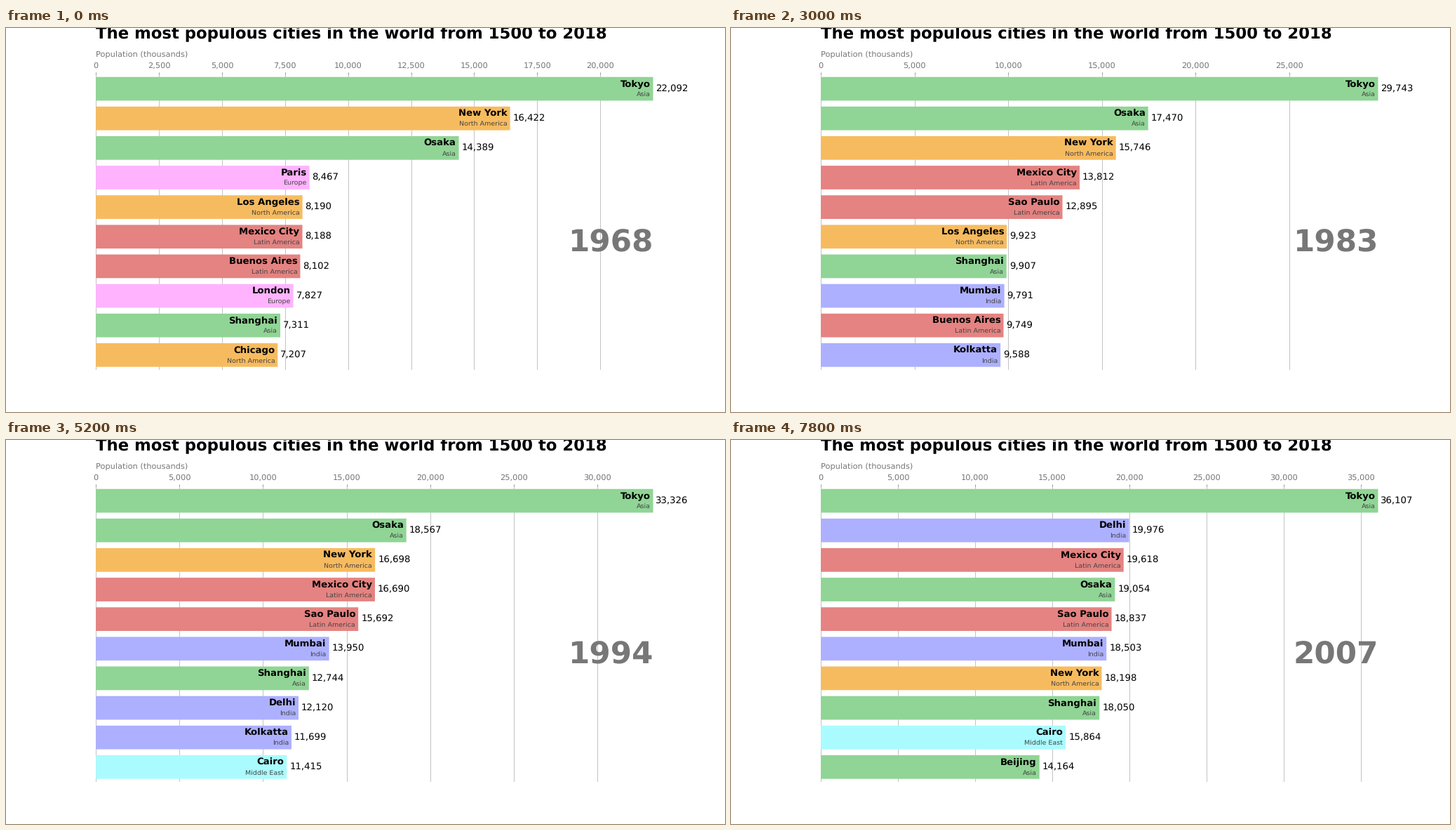
Animation of 1025x547 px, one loop 8000 ms. Source, as a matplotlib script:

```python
import numpy as np
import matplotlib.pyplot as plt
from matplotlib.animation import FuncAnimation
from matplotlib.ticker import StrMethodFormatter

WIDTH, HEIGHT = 1025, 547
DPI = WIDTH / 15
FIRST_YEAR, LAST_YEAR = 1968, 2007
GREY = "#777777"

COLORS = {
    "Asia": "#90d595",
    "Europe": "#ffb3ff",
    "North America": "#f7bb5f",
    "Latin America": "#e48381",
    "India": "#adb0ff",
    "Middle East": "#aafbff",
}

# Cities grow in straight lines between these years.
KEY_YEARS = (1968, 1974, 1980, 1990, 2002, 2007)

# name: region, first key year, thousands of people at the key years from there
CITIES = {
    "Tokyo": ("Asia", 1968, (22092, 25952, 28549, 32530, 34919, 36107)),
    "New York": ("North America", 1968,
                 (16422, 17131, 15601, 16086, 17923, 18198)),
    "Osaka": ("Asia", 1968, (14389, 16093, 17028, 18500, 18701, 19054)),
    "Mexico City": ("Latin America", 1968,
                    (8188, 10840, 13028, 15642, 18785, 19618)),
    "Sao Paulo": ("Latin America", 1968,
                  (6820, 9215, 12089, 14776, 17524, 18837)),
    "Shanghai": ("Asia", 1968, (7311, 7980, 9192, 11575, 15081, 18050)),
    "Los Angeles": ("North America", 1968, (8190, 8950, 9512, 10883, 11600)),
    "Buenos Aires": ("Latin America", 1968, (8102, 8721, 9422, 10513, 12000)),
    "Paris": ("Europe", 1968, (8467, 9295, 8720)),
    "London": ("Europe", 1968, (7827, 7400)),
    "Chicago": ("North America", 1968, (7207, 7250)),
    "Rio de Janeiro": ("Latin America", 1968, (6480, 8040, 8784)),
    "Kolkatta": ("India", 1968, (6650, 7696, 9030, 10890, 13316, 13935)),
    "Mumbai": ("India", 1974, (6750, 8658, 12436, 16977, 18503)),
    "Delhi": ("India", 1990, (9726, 16907, 19976)),
    "Cairo": ("Middle East", 1990, (10000, 14245, 15864)),
    "Beijing": ("Asia", 2002, (11222, 14164)),
}


def population(name, year):
    _, start, values = CITIES[name]
    first = KEY_YEARS.index(start)
    years = KEY_YEARS[first:first + len(values)]
    return np.interp(year, years, values, left=0)


def top_ten(year):
    """The ten largest cities, smallest first."""
    ranked = sorted((population(name, year), name) for name in CITIES)
    return ranked[-10:]


def draw_bars(rows):
    gap = rows[-1][0] / 200
    for y, (value, name) in enumerate(rows):
        region = CITIES[name][0]
        ax.barh(y, value, color=COLORS[region], snap=False)
        ax.text(value - gap, y, name, size=14, weight=600,
                ha="right", va="bottom")
        ax.text(value - gap, y - 0.25, region, size=10, color="#444444",
                ha="right", va="baseline")
        ax.text(value + gap, y, f"{value:,.0f}", size=14,
                ha="left", va="center")


def style_axes():
    ax.xaxis.set_major_formatter(StrMethodFormatter("{x:,.0f}"))
    ax.xaxis.set_ticks_position("top")
    ax.tick_params(axis="x", colors=GREY, labelsize=12)
    ax.set_yticks([])
    ax.margins(0, 0.01)
    ax.grid(which="major", axis="x", linestyle="-")
    ax.set_axisbelow(True)
    ax.set_frame_on(False)


def draw(frame):
    year = FIRST_YEAR + frame
    ax.clear()
    draw_bars(top_ten(year))
    style_axes()
    place = ax.transAxes
    ax.text(1, 0.4, year, transform=place, color=GREY, size=46,
            weight=800, ha="right")
    ax.text(0, 1.06, "Population (thousands)", transform=place,
            color=GREY, size=12)
    ax.text(0, 1.12, "The most populous cities in the world from 1500 to 2018",
            transform=place, size=24, weight=600, ha="left")


# unhinted glyphs keep their true widths at this resolution
plt.rcParams["text.hinting"] = "none"

# the small surplus guards against rounding down to one pixel less
fig, ax = plt.subplots(
    figsize=((WIDTH + 0.001) / DPI, (HEIGHT + 0.001) / DPI), dpi=DPI)
anim = FuncAnimation(fig, draw, frames=LAST_YEAR - FIRST_YEAR + 1,
                     interval=200, repeat=True)
plt.show()
```
